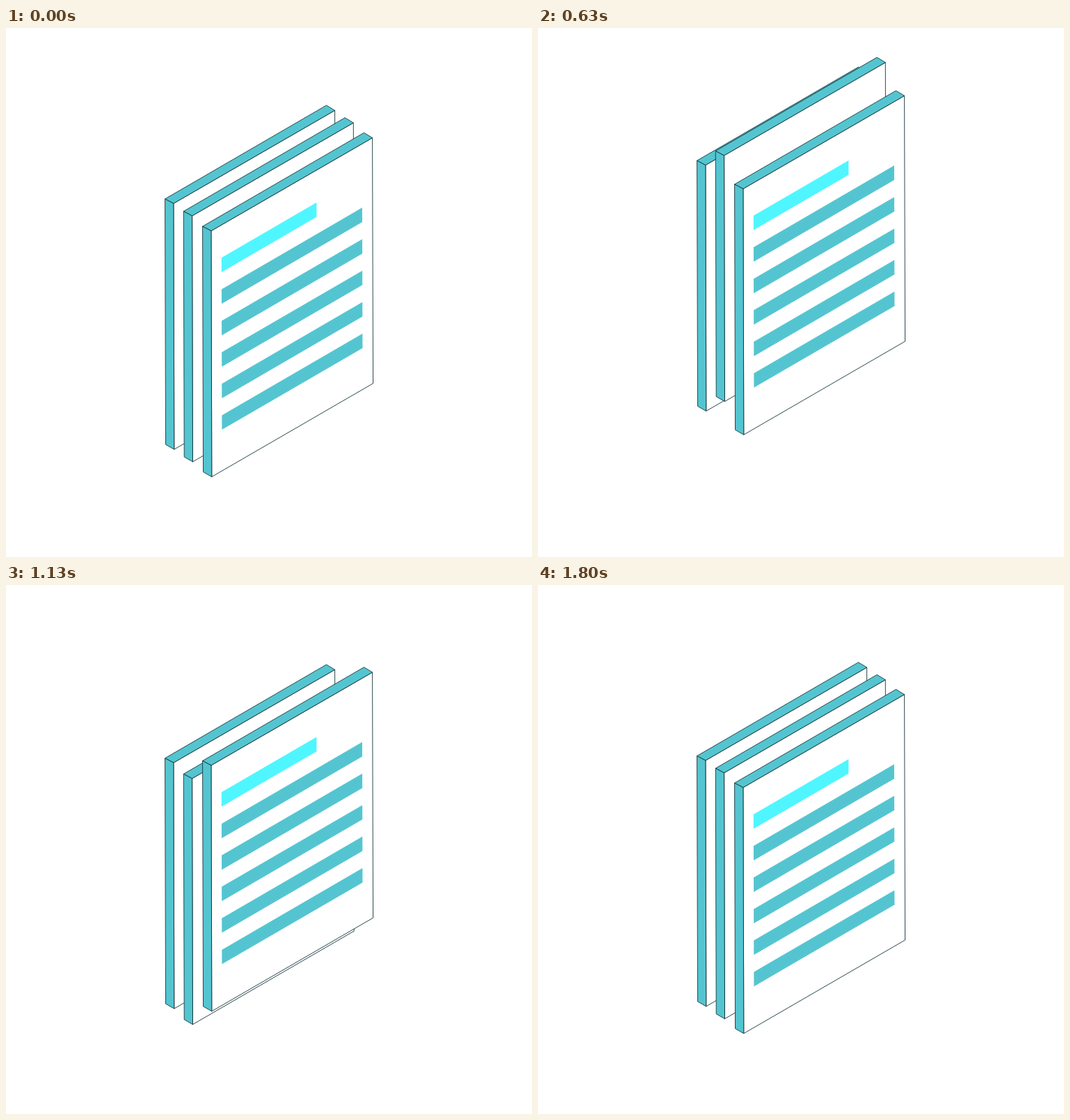
Animation of 700x704 px, one loop 1.83 s. Source, as an HTML page:

```html
<!DOCTYPE html>
<html lang="en">
<head>
<meta charset="utf-8">
<title>Bouncing sheets</title>
<style>
  html, body { margin: 0; width: 100%; height: 100%; overflow: hidden; background: #fff; }
  svg { display: block; width: 700px; height: 704px; }
  .face { stroke: #16363c; stroke-width: .85; stroke-linejoin: round; }
</style>
</head>
<body>
<svg id="stage" viewBox="0 0 700 704"></svg>
<script>
const LOOP = 1830;
const TEAL = '#54c5d0', CYAN = '#4ff6ff', WHITE = '#fff';

// Resting place of each sheet relative to the front one, and its delay in ms
const SHEETS = [
  { x: -50, y: -36.5, delay: 0 },
  { x: -25.3, y: -20, delay: 180 },
  { x: 0, y: 0, delay: 400, lines: true }
];

// One hop: [time in ms, vertical offset in px]
const HOP = [
  [0, 0], [70, -7], [130, -19], [230, -56], [290, -75], [370, -85],
  [460, -79.3], [570, -65], [630, -51], [730, -30], [790, -15],
  [880, 1.5], [960, 7.7], [1130, 3], [1190, 1], [1280, -.6],
  [1370, -1], [1430, 0], [LOOP, 0]
];

const stage = document.getElementById('stage');

function add(parent, tag, attrs) {
  const el = document.createElementNS('http://www.w3.org/2000/svg', tag);
  for (const key in attrs) el.setAttribute(key, attrs[key]);
  return parent.appendChild(el);
}

function poly(parent, points, fill, cls = '') {
  add(parent, 'polygon', { points, fill, class: cls });
}

function bar(parent, y, x1, x2, skew, fill) {
  const right = y - (x2 - x1) * .581;
  poly(parent, `${x1},${y} ${x2},${right} ${x2 + skew},${right + 19.2} ${x1 + skew},${y + 19.2}`, fill);
}

function makeSheet({ lines }) {
  const g = add(stage, 'g', {});
  poly(g, '273,270 487.6,146.2 488.5,473 273.8,597.3', WHITE, 'face');
  poly(g, '261.6,264 476.4,139.4 487.6,146.2 273,270', TEAL, 'face');
  poly(g, '261.6,264 273,270 273.8,597.3 262.5,590.8', TEAL, 'face');
  if (lines) {
    bar(g, 305.7, 286.8, 413.3, 0, CYAN);
    for (let i = 0; i < 5; i++) bar(g, 347.8 + i * 41.9, 286.9 + i * .1, 474 + i * .1, .1, TEAL);
  }
  return g;
}

// Smooth curve through the hop points
function hop(t) {
  const last = HOP.length - 1;
  let i = 0;
  while (i < last - 1 && t >= HOP[i + 1][0]) i++;
  const slope = k => k === 0 || k >= last - 1 ? 0 :
    (HOP[k + 1][1] - HOP[k - 1][1]) / (HOP[k + 1][0] - HOP[k - 1][0]);
  const [t0, y0] = HOP[i], [t1, y1] = HOP[i + 1];
  const d = t1 - t0, u = (t - t0) / d, v = 1 - u;
  return v * v * ((1 + 2 * u) * y0 + u * d * slope(i)) +
         u * u * ((1 + 2 * v) * y1 - v * d * slope(i + 1));
}

// Thirty poses a second, on a 0 / 30 / 70 ms beat
function beat(t) {
  const rest = t % 100;
  return t - rest + (rest >= 70 ? 70 : rest >= 30 ? 30 : 0);
}

const groups = SHEETS.map(makeSheet);
const start = performance.now();

function draw(now) {
  const t = beat(Math.max(0, now - start) % LOOP);
  SHEETS.forEach(({ x, y, delay }, i) => {
    const dy = y + hop((t - delay + LOOP) % LOOP);
    groups[i].setAttribute('transform', `translate(${x} ${dy.toFixed(2)})`);
  });
  requestAnimationFrame(draw);
}
draw(start);
</script>
</body>
</html>
```
